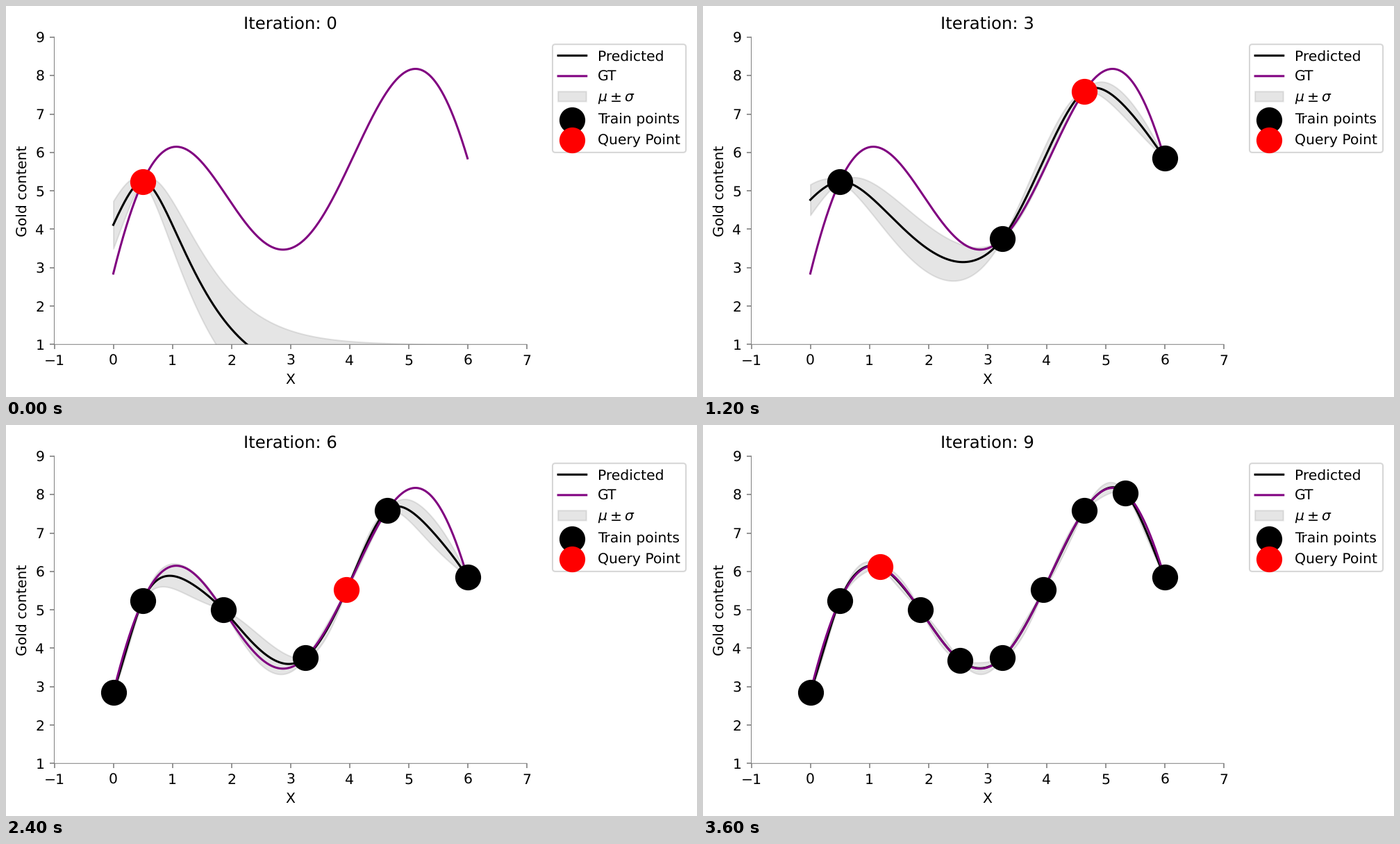
Recreate the animation shown at these times as a matplotlib script. Size 995 by 563 pixels, loop 4000 ms.

```python
import numpy as np
import matplotlib.pyplot as plt
from matplotlib.animation import FuncAnimation

W, H, DPI = 995, 563, 146.3
STEPS, LOOP = 10, 4000

plt.rcParams.update({"font.family": "DejaVu Sans", "path.snap": False,
                     "text.hinting": "none"})


def truth(x):
    return 2 * (x - 3) * np.sin(x - 3) + x / 2 + 2


def matern(a, b, length):
    s = np.sqrt(3) * np.abs(a[:, None] - b[None, :]) / length
    return (1 + s) * np.exp(-s)


def covariance(x, length):
    return matern(x, x, length) + 1e-10 * np.eye(len(x))


def log_likelihood(x, y, length):
    K = covariance(x, length)
    return -0.5 * (y @ np.linalg.solve(K, y) + np.linalg.slogdet(K)[1])


def posterior(x, y, grid):
    """Gaussian process mean and deviation at the most likely length scale."""
    length = 1.0
    if len(x) > 1:
        lengths = np.geomspace(0.2, 100, 900)
        length = max(lengths, key=lambda v: log_likelihood(x, y, v))
    K = covariance(x, length)
    k = matern(grid, x, length)
    mean = k @ np.linalg.solve(K, y)
    var = 1 - np.sum(k * np.linalg.solve(K, k.T).T, axis=1)
    return mean, np.sqrt(np.clip(var, 0, None))


grid = np.linspace(0, 6, 601)
queries = np.array([.5, 6, 3.25, 4.64, 1.86, 0, 3.95, 2.54, 5.34, 1.18])
values = truth(queries)
points = np.column_stack([queries, values])
fits = [posterior(queries[:n], values[:n], grid) for n in range(1, STEPS + 1)]

# The tiny margin keeps the pixel size from rounding down.
fig = plt.figure(figsize=((W + .001) / DPI, (H + .001) / DPI), dpi=DPI,
                 facecolor="white")
ax = fig.add_axes([69.5 / W, (H - 487.3) / H, 680.1 / W, 442.3 / H])
ax.set(xlim=(-1, 7), ylim=(1, 9), xticks=range(-1, 8), yticks=range(1, 10),
       xlabel="X", ylabel="Gold content")
for side in ("top", "right"):
    ax.spines[side].set_visible(False)
for side in ("left", "bottom"):
    ax.spines[side].set(color="gray", linewidth=0.5)
ax.tick_params(color="gray")

pred, = ax.plot([], [], color="black", label="Predicted")
gt, = ax.plot(grid, truth(grid), color="purple", label="GT")
band = ax.fill_between(grid, grid, grid, color="gray", alpha=0.2,
                       label=r"$\mu \pm \sigma$")
train = ax.scatter([], [], s=300, color="black", zorder=10,
                   label="Train points")
query = ax.scatter([], [], s=300, color="red", zorder=11,
                   label="Query Point")
title = ax.set_title("Iteration: 0")
ax.legend(handles=[pred, gt, band, train, query], loc="upper left",
          bbox_to_anchor=(1.04, 1))


def update(i):
    mean, sd = fits[i]
    pred.set_data(grid, mean)
    upper = np.column_stack([grid, mean + sd])
    lower = np.column_stack([grid, mean - sd])
    band.set_verts([np.vstack([lower, upper[::-1]])])
    train.set_offsets(points[:i])
    query.set_offsets(points[i:i + 1])
    title.set_text(f"Iteration: {i}")
    return pred, band, train, query, title


anim = FuncAnimation(fig, update, frames=STEPS, interval=LOOP / STEPS,
                     repeat=True, repeat_delay=0, blit=False)
plt.show()
```
